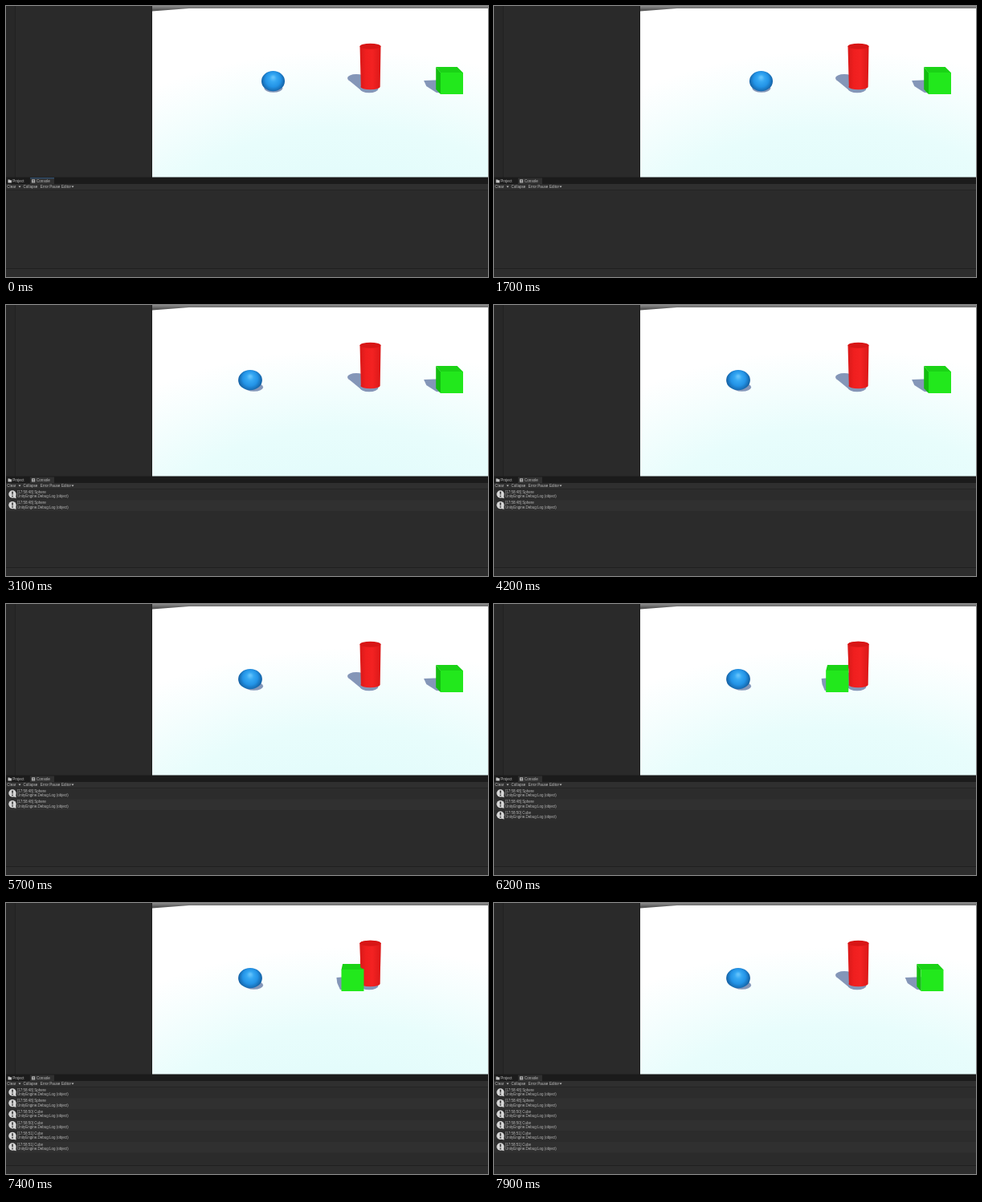
An HTML page with a canvas that plays this animation: 600x338 px, repeating every 8000 ms.

```html
<!DOCTYPE html>
<html lang="en">
<head>
<meta charset="utf-8">
<title>Drag objects</title>
<style>
  html, body { margin: 0; width: 100%; height: 100%; overflow: hidden; background: #2a2a2a; }
  canvas, svg { position: absolute; left: 0; top: 0; width: 600px; height: 338px; display: block; }
  text { font: 4.6px "Liberation Sans", Arial, sans-serif; fill: #bdbdbd; }
  .log text { font-size: 4.5px; fill: #b4b4b4; }
</style>
</head>
<body>
<canvas id="view" width="600" height="338"></canvas>
<svg viewBox="0 0 600 338">
  <rect width="182" height="214" fill="#2a2a2a"/>
  <rect width="11" height="214" fill="#282828"/>
  <rect x="11" width="1" height="214" fill="#222"/>
  <rect x="181" width="1" height="214" fill="#202020"/>
  <rect y="213.5" width="600" height="8.5" fill="#1b1b1b"/>
  <rect x="30" y="214.5" width="30" height="7.5" fill="#303030"/>
  <rect id="focus" x="30" y="214.3" width="30" height="0.9" fill="#35618f"/>
  <rect y="222" width="600" height="7" fill="#2f2f2f"/>
  <rect y="229" width="600" height="0.8" fill="#222"/>
  <rect y="229.8" width="600" height="97.2" fill="#2b2b2b"/>
  <g id="logs"></g>
  <rect y="327" width="600" height="1" fill="#1f1f1f"/>
  <rect y="328" width="600" height="10" fill="#2d2d2d"/>
  <path d="M2.5 216.5h2l.5 .7h2v3.3h-4.5z" fill="#c4c4c4"/>
  <rect x="32" y="216.3" width="4.2" height="4.2" rx=".6" fill="#b4b4b4"/>
  <path d="M33 217.6h2.2M33 219h2.2" stroke="#333" stroke-width=".6"/>
  <text x="8.2" y="220.3">Project</text>
  <text x="38" y="220.3">Console</text>
  <text x="1.3" y="227.2">Clear</text>
  <text x="21.5" y="227.2">Collapse</text>
  <text x="42.8" y="227.2">Error Pause</text>
  <text x="69" y="227.2">Editor</text>
  <path d="M15.5 224.4h3l-1.5 2zM81.5 224.4h3l-1.5 2z" fill="#c4c4c4"/>
</svg>
<script>
const LOOP = 8000, STEP = 100;
const g = document.getElementById('view').getContext('2d');
const focusBar = document.getElementById('focus');

// [time, x] turning points of each drag
const spherePath = [[1700, 332.5], [2100, 527], [3100, 304]];
const cubePath = [[5700, 555], [6300, 418], [6500, 501.5], [6900, 501.5],
                  [7300, 412], [7700, 545], [7900, 545.5]];
// [time, second, name]
const events = [[2000, 48, 'Sphere'], [2500, 48, 'Sphere'], [6100, 50, 'Cube'],
                [6400, 50, 'Cube'], [7100, 51, 'Cube'], [7400, 51, 'Cube']];

document.getElementById('logs').innerHTML = events.map(([, sec, name], i) => `
  <g class="log" transform="translate(0 ${229.8 + i * 13.6})">
    <rect width="600" height="13.6" fill="${i % 2 ? '#303030' : '#2c2c2c'}"/>
    <path d="M9 10.5l3.6 .9 -.4 -4z" fill="#d6d6d6"/>
    <circle cx="8" cy="6.2" r="4.7" fill="#d6d6d6"/>
    <path d="M7.2 3h1.7l-.4 4h-.9zM7.3 7.9h1.5v1.5h-1.5z" fill="#222"/>
    <text x="14" y="5.1">[17:58:${sec}] ${name}</text>
    <text x="14" y="10.3">UnityEngine.Debug:Log (object)</text>
  </g>`).join('');
const rows = [...document.querySelectorAll('.log')];

function along(path, t) {
  if (t <= path[0][0]) return path[0][1];
  for (let i = 1; i < path.length; i++) {
    const [t0, a] = path[i - 1], [t1, b] = path[i];
    if (t <= t1) return a + (b - a) * (1 - Math.cos(Math.PI * (t - t0) / (t1 - t0))) / 2;
  }
  return path[path.length - 1][1];
}

function poly(fill, ...pts) {
  g.beginPath();
  pts.forEach(([x, y]) => g.lineTo(x, y));
  g.closePath();
  g.fillStyle = fill;
  g.fill();
}

function oval(fill, x, y, rx, ry) {
  g.beginPath();
  g.ellipse(x, y, rx, ry, 0, 0, 7);
  g.fillStyle = fill;
  g.fill();
}

function shade(gradient, ...stops) {
  stops.forEach(([at, color]) => gradient.addColorStop(at, color));
  return gradient;
}

const SHADOW = '#8496b8', CYL = 453.5;

function floor() {
  g.fillStyle = '#fff';
  g.fillRect(182, 0, 418, 214);
  g.save();
  g.beginPath();
  g.rect(182, 0, 418, 214);
  g.clip();
  g.translate(430, 300);
  g.scale(420, 245);
  g.fillStyle = shade(g.createRadialGradient(0, 0, 0, 0, 0, 1),
    [0, '#dcfafa'], [.6, '#e8fdfc'], [1, '#fff']);
  g.fillRect(-1, -2, 2, 3);
  g.restore();
  poly(shade(g.createLinearGradient(0, 0, 0, 5), [0, '#8c8c8c'], [1, '#555']),
    [182, 0], [600, 0], [600, 3], [228, 3], [182, 6.5]);
}

function cylinderShadow() {
  oval(SHADOW, 436, 90, 11, 5);
  oval(SHADOW, 452, 103, 11.5, 5.2);
  poly(SHADOW, [426, 92], [444, 86], [462, 100], [443, 106]);
}

function cylinder() {
  g.beginPath();
  g.moveTo(440.5, 50);
  g.lineTo(441.8, 100.5);
  g.ellipse(CYL, 100.5, 12.2, 3.8, 0, Math.PI, 0, true);
  g.lineTo(466.5, 50);
  g.fillStyle = shade(g.createLinearGradient(440, 0, 467, 0),
    [0, '#d61818'], [.3, '#f01f1f'], [.6, '#f32222'], [1, '#d91717']);
  g.fill();
  oval('#d81616', CYL, 50.3, 13, 3.5);
}

function cubeShadow(x) {
  const e = 5.5 + (x - 427) * .12, l = x - 14;
  poly(SHADOW, [l - e, 93], [l + 6, 92], [l + 6, 109], [l - e * .25, 108], [l - e * .85, 100]);
}

function cube(x) {
  const bx = 445 + (x - 445) * .94, l = x - 14, r = x + 14, bl = bx - 13.2, br = bx + 13.2;
  if (bl < l) poly('#14bd10', [bl, 76], [l, 83], [l, 110], [bl, 104]);
  if (br > r) poly('#14bd10', [br, 76], [r, 83], [r, 110], [br, 104]);
  poly('#1ad316', [bl, 76], [br, 76], [r, 83.2], [l, 83.2]);
  poly('#22e81c', [l, 83], [r, 83], [r, 110], [l, 110]);
  if (Math.abs(x - CYL) < 29) {
    // the cylinder pokes out through the top face
    g.save();
    g.beginPath();
    g.rect(430, 40, 50, 39.5);
    g.ellipse(CYL, 79.5, 12.5, 3.6, 0, 0, Math.PI);
    g.clip();
    cylinder();
    g.restore();
  }
}

function sphereShadow(x) {
  oval(SHADOW, x - (x - 335) * .15, 102.5, 11.5, 5.2);
}

function sphere(x) {
  const y = 94, d = x - CYL || .01, mid = (x + CYL) / 2, far = x + Math.sign(d) * 40;
  const rx = 13 + Math.abs(x - 450) * .013;
  // visible up to the curve where it meets the cylinder
  g.save();
  g.beginPath();
  for (let k = -16; k <= 16; k++) g.lineTo(mid + k * k / (2 * d), y + k);
  g.lineTo(far, y + 16);
  g.lineTo(far, y - 16);
  if (Math.abs(d) < 45) g.clip();
  oval(shade(g.createRadialGradient(x, y - 5, 1, x, y - 1, 15),
    [0, '#62c2fb'], [.25, '#36a8f3'], [.6, '#2393e6'], [1, '#125d9f']), x, y - .3, rx, 12.6);
  g.restore();
}

function draw(now) {
  const t = Math.floor(now % LOOP / STEP) * STEP;
  const sx = along(spherePath, t), cx = along(cubePath, t);
  floor();
  cylinderShadow();
  cubeShadow(cx);
  sphereShadow(sx);
  cylinder();
  cube(cx);
  sphere(sx);
  focusBar.style.visibility = t < 1700 ? 'visible' : 'hidden';
  rows.forEach((row, i) => row.style.visibility = t >= events[i][0] ? 'visible' : 'hidden');
}

let start;
function tick(now) {
  start ??= now;
  draw(now - start);
  requestAnimationFrame(tick);
}
draw(0);
requestAnimationFrame(tick);
</script>
</body>
</html>
```
